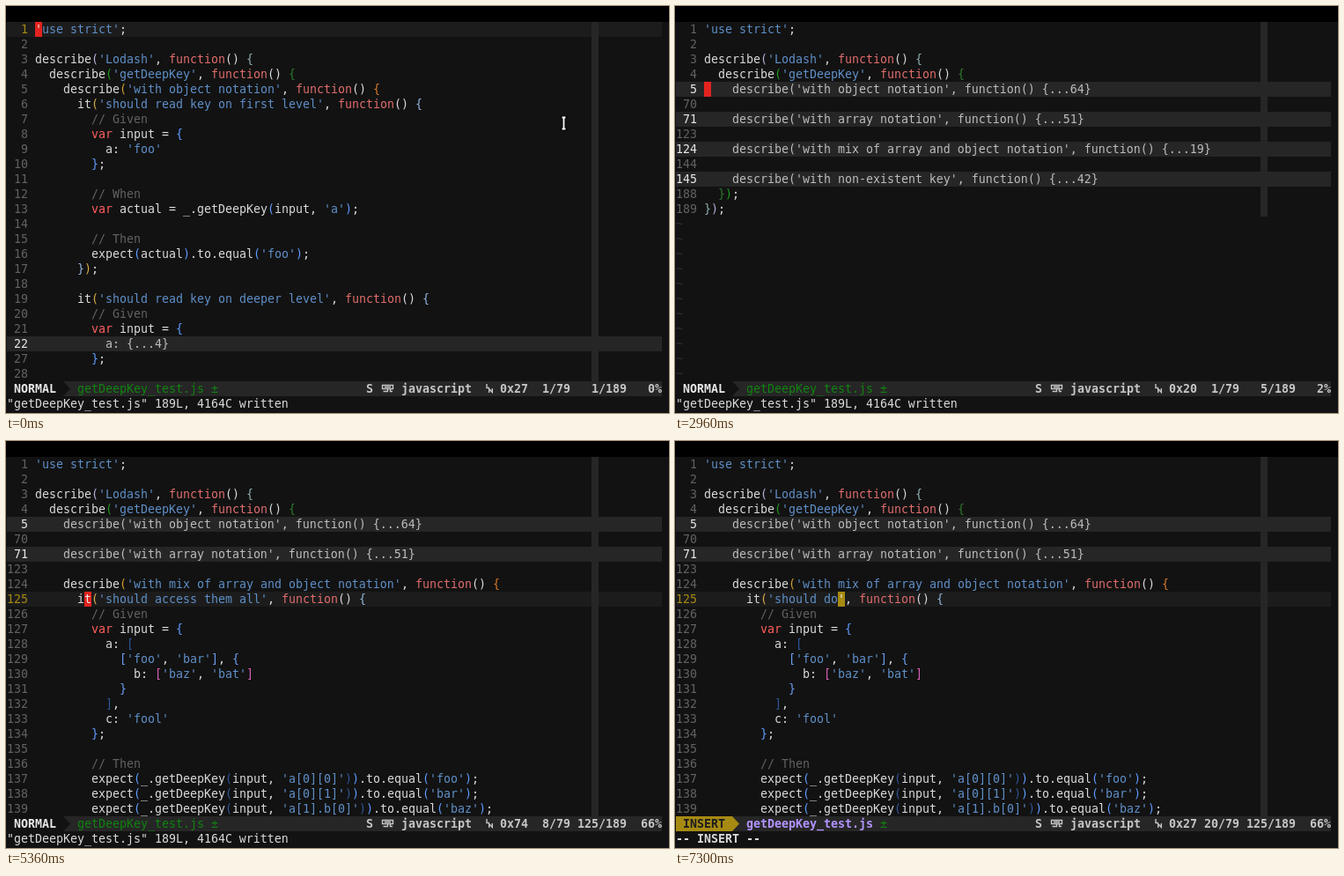
These frames come from a looping animation (753x462 px, 8 s). An HTML page:

```html
<!DOCTYPE html>
<html lang="en">
<head>
<meta charset="utf-8">
<title>Editor folds</title>
<style>
  html, body { margin: 0; width: 100%; height: 100%; overflow: hidden; background: #121212; }
  svg { display: block; width: 753px; height: 462px; }
  text { font: 13.29px "DejaVu Sans Mono", monospace; white-space: pre; }
  .b { font-weight: bold; }
</style>
</head>
<body>
<svg id="stage" viewBox="0 0 753 462" xmlns="http://www.w3.org/2000/svg"></svg>
<script>
const LOOP = 8000, CW = 8, LH = 17, TOP = 18, LEFT = 33;
const C = {
  bg: '#121212', line: '#1c1c1c', fold: '#262626', text: '#dadada', foldText: '#bcbcbc',
  num: '#626262', gold: '#a68a12', string: '#5f8fc7', fn: '#e06c6c', kw: '#ff5f5f',
  comment: '#626262', cursor: '#e2231f', bright: '#e8e8e8', green: '#108410'
};
// bracket colour by nesting depth
const DEPTH = ['#b2b2da', '#8fb0b0', '#1c9a1c', '#2c7a2c', '#d2a02c', '#d7782c',
  '#d7ab4a', '#93b4dc', '#5f9bff', '#2f5597', '#6c9cf0', '#d75fb7'];

const HEAD = [
  [1, "'use strict';"], [2, ''],
  [3, "describe('Lodash', function() {"],
  [4, "  describe('getDeepKey', function() {"]
];
const number = (start, text) => text.split('\n').map((s, i) => [start + i, s]);

const OPEN = [...HEAD, ...number(5, `    describe('with object notation', function() {
      it('should read key on first level', function() {
        // Given
        var input = {
          a: 'foo'
        };

        // When
        var actual = _.getDeepKey(input, 'a');

        // Then
        expect(actual).to.equal('foo');
      });

      it('should read key on deeper level', function() {
        // Given
        var input = {
          a: {...4}`), [27, '        };'], [28, '']];

const FOLDS = [...HEAD,
  [5, "    describe('with object notation', function() {...64}"], [70, ''],
  [71, "    describe('with array notation', function() {...51}"], [123, ''],
  [124, "    describe('with mix of array and object notation', function() {...19}"], [144, ''],
  [145, "    describe('with non-existent key', function() {...42}"],
  [188, '  });'], [189, '});']
];

const mixView = title => [...FOLDS.slice(0, 8), ...number(124,
`    describe('with mix of array and object notation', function() {
      it('${title}', function() {
        // Given
        var input = {
          a: [
            ['foo', 'bar'], {
              b: ['baz', 'bat']
            }
          ],
          c: 'fool'
        };

        // Then
        expect(_.getDeepKey(input, 'a[0][0]')).to.equal('foo');
        expect(_.getDeepKey(input, 'a[0][1]')).to.equal('bar');
        expect(_.getDeepKey(input, 'a[1].b[0]')).to.equal('baz');`)];

// [time, value] tracks
const ROW = [[0, 0], [2360, 1], [2680, 2], [2800, 3], [2960, 4], [3050, 5], [3160, 6],
  [3300, 7], [3420, 8], [4240, 9]];
const COL = [[0, 1], [4710, 2], [5220, 3], [5280, 5], [5320, 7], [5360, 8], [5400, 9], [5440, 10]];
const KEYS = [[0, ''], [1220, 'z'], [1650, ''], [3570, 'z'], [3640, ''],
  [5730, 'c'], [5850, 'ci'], [6090, '']];
const TYPED = [[0, 0], [6290, 1], [6350, 2], [6500, 3], [6550, 4], [6650, 5], [6750, 6],
  [6860, 7], [7160, 8], [7300, 9]];
const at = (track, t) => track.reduce((v, [when, next]) => t >= when ? next : v, track[0][1]);

const esc = s => s.replace(/&/g, '&amp;').replace(/</g, '&lt;');
const rect = (x, y, w, h, fill) => `<rect x="${x}" y="${y}" width="${w}" height="${h}" fill="${fill}"/>`;
const path = (d, fill, more = '') => `<path d="${d}" fill="${fill}" ${more}/>`;
const label = (x, y, s, fill, bold) =>
  s ? `<text x="${x}" y="${y + 13}" fill="${fill}"${bold ? ' class="b"' : ''}>${esc(s)}</text>` : '';
const labelEnd = (x, y, s, fill, bold) => label(x - s.length * CW, y, s, fill, bold);
const isFold = s => /\{\.\.\.\d+\}/.test(s);

function code(s, y, nest) {
  let out = '';
  for (const m of s.matchAll(/\/\/.*|'[^']*'|\bfunction\b|\bvar\b|\(\)|[()[\]{}]|\w+|[^\w\s]/g)) {
    const k = m[0];
    let fill = C.text;
    if (k.startsWith('//')) fill = C.comment;
    else if (k[0] === "'") fill = C.string;
    else if (k === 'function') fill = C.fn;
    else if (k === 'var') fill = C.kw;
    else if (/^[([{]$/.test(k)) fill = DEPTH[nest.depth++];
    else if (/^[)\]}]$/.test(k)) fill = DEPTH[--nest.depth];
    out += label(LEFT + m.index * CW, y, k, fill);
  }
  return out;
}

function buffer(rows, cur, col, insert) {
  const nest = { depth: 0 };
  let out = rect(665, TOP, CW, rows.length * LH, C.fold);
  rows.forEach(([n, s], i) => {
    const y = TOP + i * LH, fold = isFold(s), here = i === cur;
    if (fold) out += rect(1, y, 744, LH, C.fold);
    else if (here) out += rect(1, y, 664, LH, C.line) + rect(673, y, 72, LH, C.line);
    out += labelEnd(25, y, String(n), fold ? C.bright : here ? C.gold : C.num);
    out += fold ? label(LEFT, y, s, C.foldText) : code(s, y, nest);
    if (here) {
      const x = LEFT + (col - 1) * CW;
      out += rect(x, y, CW, LH, insert ? C.gold : C.cursor) + label(x, y, s.charAt(col - 1).trim(), C.bright);
    }
  });
  for (let i = rows.length; i < 24; i++) out += label(1, TOP + i * LH, '~', '#303030');
  return out;
}

function statusBar(line, ch, col, insert) {
  const y = 426, ink = '#c6c6c6', mode = insert ? C.gold : C.bg;
  const hex = '0x' + ch.toString(16).padStart(2, '0');
  const file = 'getDeepKey_test.js';
  return rect(1, y, 744, LH, C.fold) +
    path(`M1 ${y}H65L73 ${y + 8.5}L65 ${y + LH}H1Z`, mode) +
    label(9, y, insert ? 'INSERT' : 'NORMAL', insert ? '#1c1c1c' : C.bright, true) +
    label(81, y, file, insert ? '#b294ff' : C.green, insert) + label(233, y, '±', C.green) +
    label(409, y, 'S', ink, true) +
    path('M427.5 430.5H439.5V434.5H427.5ZM430 432.5H437M428.5 437.5H433.5V434.5M436.5 434.5V437.5H439', 'none',
      `stroke="${ink}" stroke-width="1.4"`) +
    label(449, y, 'javascript', ink, true) +
    path('M546 429V433.5H549M548.7 439V434.5L552.3 438.5V434', 'none', `stroke="${ink}" stroke-width="1.4"`) +
    label(561, y, hex, ink, true) +
    labelEnd(641, y, col + '/79', ink, true) +
    labelEnd(705, y, line + '/189', ink, true) +
    labelEnd(745, y, Math.floor(line / 189 * 100) + '%', ink, true);
}

function pointer() {
  const d = 'M631.5 126.5H635.5M633.5 126.5V139.5M631.5 139.5H635.5';
  return path(d, 'none', 'stroke="#000" stroke-width="3.4" stroke-linecap="square"') +
    path(d, 'none', 'stroke="#fff" stroke-width="1.8"');
}

function scene(t) {
  const insert = t >= 6090, typed = at(TYPED, t);
  const title = insert ? 'should do'.slice(0, typed) : 'should access them all';
  const rows = t < 1650 ? OPEN : t < 3640 ? FOLDS : mixView(title);
  const cur = at(ROW, t), col = insert ? 11 + typed : at(COL, t);
  const [line, text] = rows[cur];
  return rect(0, 0, 753, 462, C.bg) + rect(0, 0, 753, TOP, '#000') +
    buffer(rows, cur, col, insert) +
    statusBar(line, text.charCodeAt(col - 1) || 0, col, insert) +
    label(1, 443, insert ? '-- INSERT --' : '"getDeepKey_test.js" 189L, 4164C written', C.text, insert) +
    label(657, 443, at(KEYS, t), C.text) +
    (t < 1220 ? pointer() : '');
}

const stage = document.getElementById('stage');
let shown = '';
function draw(t) {
  const next = scene(t);
  if (next !== shown) stage.innerHTML = shown = next;
}
const start = performance.now();
function tick() {
  draw((performance.now() - start) % LOOP);
  requestAnimationFrame(tick);
}
draw(0);
requestAnimationFrame(tick);
</script>
</body>
</html>
```
